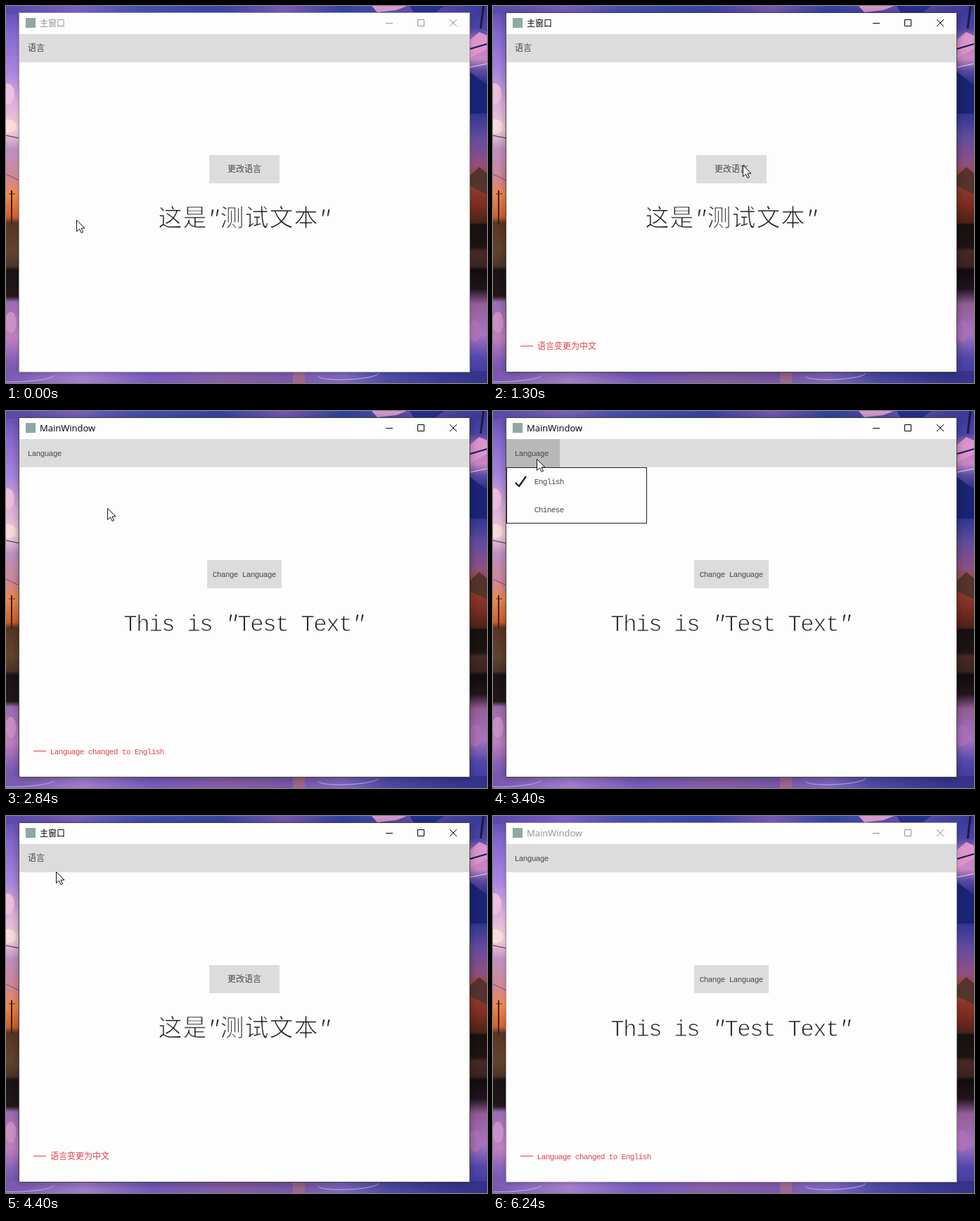
Write an HTML page with a canvas that moves like this. It is 684 by 536 pixels and loops after 6270 ms.

```html
<!DOCTYPE html>
<html lang="en">
<head>
<meta charset="utf-8">
<title>Language switch</title>
<style>
  html, body { margin: 0; width: 100%; height: 100%; overflow: hidden; background: #4d4290; }
  canvas { display: block; width: 684px; height: 536px; }
</style>
</head>
<body>
<canvas id="stage" width="684" height="536"></canvas>
<script>
const LOOP = 6270;
const STATUS_TIME = 1000;
const ctx = document.getElementById('stage').getContext('2d');

const CJK = '"Noto Sans CJK SC", "Noto Sans CJK", sans-serif';
const MONO = '"Liberation Mono", "DejaVu Sans Mono", monospace';
const COLORS = {
  paper: '#fdfdfd', bar: '#dcdcdc', pressed: '#b8b8b8', hover: '#f0f0f0',
  ink: '#484848', heading: '#242424', status: '#e2404a'
};

const WORDS = {
  zh: { title: '主窗口', menu: '语言', button: '更改语言', heading: '这是"测试文本"',
        status: '语言变更为中文', items: ['英文', '中文'], checked: 1, menuWidth: 52, buttonWidth: 100 },
  en: { title: 'MainWindow', menu: 'Language', button: 'Change Language', heading: 'This is "Test Text"',
        status: 'Language changed to English', items: ['English', 'Chinese'], checked: 0, menuWidth: 76, buttonWidth: 106 }
};

// [time, language]
const SWITCHES = [[900, 'en'], [1200, 'zh'], [1660, 'en'], [2080, 'zh'], [2400, 'en'], [4070, 'zh'], [5250, 'en']];
const MENU_OPEN = [[3250, 4070], [4680, 5250]];

// [time, x, y]
const POINTER = [
  [0, 100, 304], [30, 100, 304], [630, 350, 230], [930, 355, 226], [2440, 355, 226],
  [2840, 144, 138], [3050, 62, 68], [3600, 62, 68], [3890, 73, 139], [4200, 73, 139],
  [4400, 71, 79], [4560, 65, 62], [4700, 65, 62], [4870, 68, 103], [5260, 68, 103],
  [5470, 82, 143], [5740, 150, 560], [LOOP, 150, 560]
];

const clamp = v => Math.max(0, Math.min(1, v));
const mix = (a, b, k) => a + (b - a) * k;

function pointerAt(t) {
  const i = Math.max(1, POINTER.findIndex(p => p[0] > t));
  const [t0, x0, y0] = POINTER[i - 1], [t1, x1, y1] = POINTER[i];
  const k = (t - t0) / (t1 - t0);
  return { x: Math.round(mix(x0, x1, k)), y: Math.round(mix(y0, y1, k)) };
}

function rect(x, y, w, h, color) {
  ctx.fillStyle = color;
  ctx.fillRect(x, y, w, h);
}

function polygon(color, ...points) {
  ctx.fillStyle = color;
  ctx.beginPath();
  points.forEach(([x, y]) => ctx.lineTo(x, y));
  ctx.closePath();
  ctx.fill();
}

function line(color, width, ...points) {
  ctx.strokeStyle = color;
  ctx.lineWidth = width;
  ctx.beginPath();
  points.forEach(([x, y]) => ctx.lineTo(x, y));
  ctx.stroke();
}

function blob(x, y, rx, ry, color) {
  ctx.fillStyle = color;
  ctx.beginPath();
  ctx.ellipse(x, y, rx, ry, 0, 0, Math.PI * 2);
  ctx.fill();
}

const isWide = ch => ch > '\u2e80';
const advance = (ch, size) => isWide(ch) ? size : Math.ceil(size / 2);
const textWidth = (text, size) => [...text].reduce((w, ch) => w + advance(ch, size), 0);

// Half-width and full-width cells, as in a fixed-pitch East Asian font.
// `thin` shaves the outline with the paper colour for a lighter weight.
function cellText(text, x, baseline, size, color, thin = 0) {
  ctx.fillStyle = color;
  ctx.strokeStyle = COLORS.paper;
  ctx.lineWidth = thin;
  ctx.lineJoin = 'round';
  ctx.textAlign = 'center';
  for (const ch of text) {
    const step = advance(ch, size);
    ctx.font = isWide(ch) ? `300 ${size - (thin ? 1 : 0)}px ${CJK}`
      : `${ch === '"' ? 'italic ' : ''}${Math.round(size * 0.94)}px ${MONO}`;
    ctx.fillText(ch, x + step / 2, baseline);
    if (thin) ctx.strokeText(ch, x + step / 2, baseline);
    x += step;
  }
}

function gradientStrip(x, y, w, h, stops, vertical = true) {
  const g = vertical ? ctx.createLinearGradient(0, y, 0, y + h) : ctx.createLinearGradient(x, 0, x + w, 0);
  stops.forEach(([at, color]) => g.addColorStop(at, color));
  rect(x, y, w, h, g);
}

function drawBackdrop() {
  gradientStrip(0, 0, 20, 536, [
    [0, '#5a48ac'], [0.07, '#8468d0'], [0.17, '#a884e0'], [0.26, '#e0b0dc'], [0.33, '#f2cfd6'],
    [0.38, '#c090c4'], [0.45, '#d08898'], [0.5, '#f08a50'], [0.56, '#d0602c'], [0.575, '#5a3424'],
    [0.65, '#62442c'], [0.69, '#4c3428'], [0.7, '#1a1214'], [0.77, '#22181a'], [0.785, '#9a6cb0'],
    [0.88, '#c080c0'], [0.94, '#8660b8'], [1, '#6450a8']
  ]);
  gradientStrip(658, 0, 26, 536, [
    [0, '#36389a'], [0.06, '#4c44a4'], [0.1, '#b87cc8'], [0.14, '#cc88c4'], [0.17, '#5c4ca4'],
    [0.21, '#242c84'], [0.28, '#2c3490'], [0.35, '#644ca0'], [0.42, '#905080'], [0.45, '#a04434'],
    [0.53, '#7a2c20'], [0.575, '#4a2218'], [0.58, '#161010'], [0.64, '#1e1412'], [0.65, '#482824'],
    [0.69, '#3c2422'], [0.7, '#120c0e'], [0.75, '#20141c'], [0.79, '#945c98'], [0.87, '#a874c0'],
    [0.93, '#5448ac'], [1, '#38349c']
  ]);
  gradientStrip(0, 0, 684, 11, [
    [0, '#5a48ac'], [0.15, '#7860c4'], [0.27, '#4650b0'], [0.45, '#3a44a8'], [0.58, '#7858b4'],
    [0.7, '#3044a0'], [0.85, '#6450b0'], [1, '#36389a']
  ], false);
  gradientStrip(0, 519, 684, 17, [
    [0, '#7858b4'], [0.16, '#a680d0'], [0.3, '#785cc0'], [0.45, '#8860a8'], [0.59, '#7c58ac'],
    [0.7, '#8068c0'], [0.79, '#504ca8'], [0.9, '#3c3c98'], [1, '#343288']
  ], false);

  polygon('#d898d0', [520, 0], [570, 0], [555, 6], [528, 9]);
  polygon('#263090', [574, 0], [623, 0], [610, 10], [580, 10]);
  polygon('#1a2474', [660, 94], [684, 112], [684, 153], [660, 153]);
  polygon('#dc94cc', [660, 48], [673, 37], [684, 42], [684, 61], [660, 74]);
  polygon('#54342c', [660, 241], [673, 229], [684, 238], [684, 268], [660, 256]);
  blob(2, 125, 10, 15, '#f0bede');
  blob(2, 171, 13, 10, '#fadcde');
  blob(7, 450, 8, 15, '#cc90c8');
  blob(667, 462, 9, 15, '#ac70b8');
  rect(408, 520, 17, 16, '#a06890');
  line('#362450', 1, [0, 184], [19, 188]);
  line('#704c80', 1, [0, 239], [19, 248]);
  line('#38241e', 2, [8, 262], [8, 310]);
  line('#38241e', 1, [4, 267], [13, 267]);
  line('#141a54', 2, [660, 61], [684, 54]);
  line('#e0dcf6', 1, [660, 87], [684, 82]);
  line('#1e1a3c', 3, [679, 0], [675, 32]);
  ctx.strokeStyle = '#c8b0e4';
  ctx.lineWidth = 1;
  [[23, 527, 46, 7], [487, 524, 43, 7]].forEach(([x, y, rx, ry]) => {
    ctx.beginPath();
    ctx.ellipse(x, y, rx, ry, -0.05, 0, Math.PI);
    ctx.stroke();
  });
}

function drawTitleBar(words, focus) {
  const shade = Math.round(mix(146, 0, focus));
  const ink = `rgb(${shade},${shade},${shade})`;
  rect(28, 17, 14, 14, '#8fa8a4');
  ctx.textAlign = 'left';
  ctx.fillStyle = ink;
  ctx.font = isWide(words.title[0]) ? `12px ${CJK}` : '13px "Open Sans", "Noto Sans", sans-serif';
  ctx.fillText(words.title, 48, 29);
  rect(540, 24, 10, 1, ink);
  ctx.strokeStyle = ink;
  ctx.lineWidth = 1;
  ctx.strokeRect(585.5, 19.5, 9, 9);
  line(ink, 1, [631, 19], [641, 29]);
  line(ink, 1, [641, 19], [631, 29]);
}

function drawWindow(words, focus) {
  ctx.save();
  ctx.shadowColor = `rgba(0,0,0,${mix(0.2, 0.35, focus)})`;
  ctx.shadowBlur = mix(6, 12, focus);
  ctx.shadowOffsetY = 2;
  rect(18, 9, 642, 512, focus > 0.5 ? '#484848' : '#98989c');
  ctx.restore();
  rect(19, 10, 640, 510, COLORS.paper);
  drawTitleBar(words, focus);
  rect(19, 40, 640, 40, COLORS.bar);

  const w = words.buttonWidth;
  rect(339 - w / 2, 212, w, 40, COLORS.bar);
  cellText(words.button, 339 - textWidth(words.button, 12) / 2, 236, 12, COLORS.ink);
  cellText(words.heading, 339 - textWidth(words.heading, 35) / 2, 313, 35, COLORS.heading, 1);
}

function drawMenu(words, pointer) {
  rect(19, 40, words.menuWidth, 40, COLORS.pressed);
  rect(19, 80, 200, 80, '#202020');
  rect(20, 81, 198, 78, COLORS.paper);
  words.items.forEach((label, i) => {
    const top = 81 + i * 40;
    const over = pointer.x > 19 && pointer.x < 219 && pointer.y >= top && pointer.y < top + 39;
    if (over) rect(20, top, 198, 38, COLORS.hover);
    cellText(label, 59, top + 23, 12, COLORS.ink);
    if (i === words.checked) line('#202020', 2.4, [32, top + 21], [37, top + 26], [47, top + 12]);
  });
}

function drawStatus(text) {
  rect(39, 483, 18, 1, COLORS.status);
  cellText(text, 63, 488, 12, COLORS.status);
}

function drawPointer({ x, y }) {
  ctx.save();
  ctx.translate(x + 0.5, y + 0.5);
  const outline = [[0, 0], [0, 16], [4, 12.5], [6.5, 18], [9, 17], [6.5, 11.5], [11.5, 11.5]];
  polygon('#fff', ...outline);
  line('#101018', 1, ...outline, outline[0]);
  ctx.restore();
}

function draw(t) {
  const [switchedAt, language] = SWITCHES.filter(([at]) => at <= t).pop() || [-STATUS_TIME, 'zh'];
  const words = WORDS[language];
  const focus = clamp((t - 670) / 200) * (1 - clamp((t - 6010) / 200));
  const pointer = pointerAt(t);

  drawBackdrop();
  drawWindow(words, focus);
  if (t - switchedAt < STATUS_TIME) drawStatus(words.status);
  if (MENU_OPEN.some(([from, to]) => t >= from && t < to)) drawMenu(words, pointer);
  cellText(words.menu, 31, 64, 12, COLORS.ink);
  drawPointer(pointer);
}

const start = performance.now();
function tick() {
  draw((performance.now() - start) % LOOP);
  requestAnimationFrame(tick);
}
tick();
</script>
</body>
</html>
```
